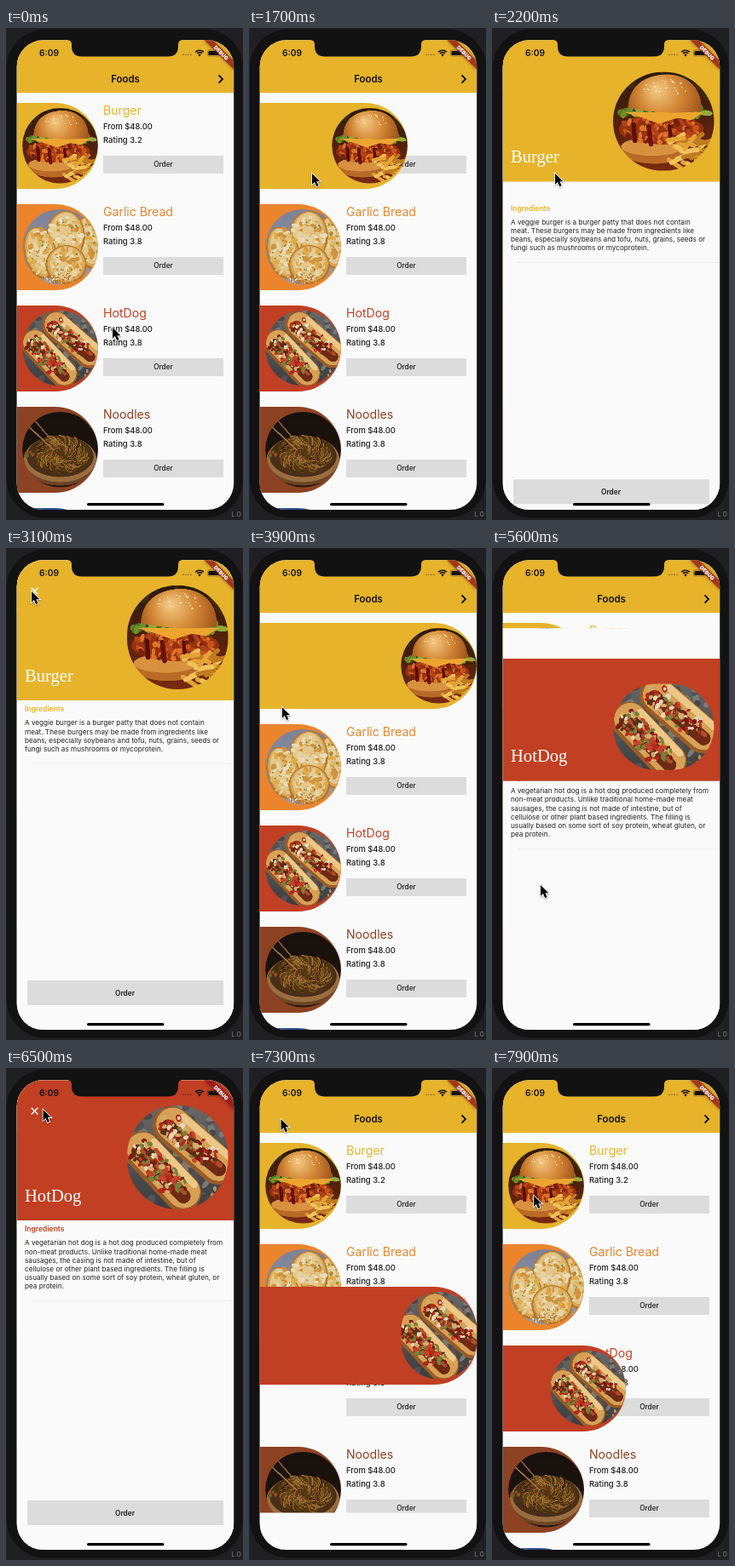
An HTML page with a canvas that plays this animation: 278 px wide and 578 px high, repeating every 8 s.

```html
<!DOCTYPE html>
<html lang="en">
<head>
<meta charset="utf-8">
<title>Foods</title>
<style>
html, body { margin: 0; width: 100%; height: 100%; overflow: hidden; background: #1c1c1e; }
canvas { display: block; width: 278px; height: 578px; }
</style>
</head>
<body>
<canvas id="stage"></canvas>
<script>
const LOOP = 8000, W = 278, H = 578;
const GROW = 500, FLIGHT = 400;
const SCREEN = { x: 12.6, y: 14.3, w: 254.6, h: 551.7 };
const RIGHT = SCREEN.x + SCREEN.w;
const SANS = 'Inter, Roboto, sans-serif';
const SERIF = '"Liberation Serif", "Noto Serif", serif';
const YELLOW = '#e6b32b', BEZEL = '#121212', PAPER = '#fafafa';

const canvas = document.getElementById('stage');
const dpr = window.devicePixelRatio || 1;
canvas.width = W * dpr;
canvas.height = H * dpr;
const g = canvas.getContext('2d');

const foods = [
  { name: 'Burger', color: YELLOW, rating: '3.2', art: burger, lines: [
    'A veggie burger is a burger patty that does not contain',
    'meat. These burgers may be made from ingredients like',
    'beans, especially soybeans and tofu, nuts, grains, seeds or',
    'fungi such as mushrooms or mycoprotein.'] },
  { name: 'Garlic Bread', color: '#ec842c', rating: '3.8', art: bread },
  { name: 'HotDog', color: '#c13f23', rating: '3.8', art: hotdog, lines: [
    'A vegetarian hot dog is a hot dog produced completely from',
    'non-meat products. Unlike traditional home-made meat',
    'sausages, the casing is not made of intestine, but of',
    'cellulose or other plant based ingredients. The filling is',
    'usually based on some sort of soy protein, wheat gluten, or',
    'pea protein.'] },
  { name: 'Noodles', color: '#8c4223', rating: '3.8', art: noodles },
  { name: '', color: '#2f4c8c', rating: '', art: noodles }
];

const visits = [
  { food: 0, grow: 1456, push: 1956, pop: 3450, shrink: 3900 },
  { food: 2, grow: 4939, push: 5439, pop: 7100, shrink: 7555 }
];

// time, x, y of the pointer tip
const pointer = [
  [0, 125, 352], [300, 125, 352], [1300, 74, 171], [2200, 74, 171],
  [2950, 30, 51], [3500, 30, 51], [4450, 53, 405], [4900, 53, 405],
  [5500, 57, 396], [5800, 57, 396], [6450, 44, 49], [6800, 36, 48],
  [7150, 36, 48], [7850, 49, 150], [8000, 49, 150]
];

const clamp = v => Math.max(0, Math.min(1, v));
const mix = (a, b, k) => a + (b - a) * k;
const rowTop = i => 88 + 119 * i;

function bezier(x1, y1, x2, y2) {
  const at = (a, b, s) => 3 * (1 - s) * (1 - s) * s * a + 3 * (1 - s) * s * s * b + s * s * s;
  return x => {
    let lo = 0, hi = 1;
    for (let i = 0; i < 24; i++) {
      const mid = (lo + hi) / 2;
      if (at(x1, x2, mid) < x) lo = mid; else hi = mid;
    }
    return at(y1, y2, lo);
  };
}
const slideEase = bezier(0.35, 0.91, 0.33, 0.97);
const heroEase = bezier(0.4, 0, 0.2, 1);

function seeded(seed) {
  return () => {
    seed = (seed * 16807) % 2147483647;
    return seed / 2147483647;
  };
}

/* ---- food pictures, drawn in a box of -44..44 ---- */

function oval(c, x, y, rx, ry, fill, turn = 0) {
  c.fillStyle = fill;
  c.beginPath();
  c.ellipse(x, y, rx, ry, turn, 0, 7);
  c.fill();
}

function stroke(c, color, width, x1, y1, x2, y2) {
  c.strokeStyle = color;
  c.lineWidth = width;
  c.lineCap = 'round';
  c.beginPath();
  c.moveTo(x1, y1);
  c.lineTo(x2, y2);
  c.stroke();
}

function specks(c, rnd, n, x, y, rx, ry, size, colors) {
  for (let i = 0; i < n; i++) {
    const a = rnd() * 6.28, d = Math.sqrt(rnd());
    oval(c, x + Math.cos(a) * d * rx, y + Math.sin(a) * d * ry,
      size * (0.5 + rnd()), size * (0.4 + rnd() * 0.6), colors[Math.floor(rnd() * colors.length)], rnd() * 3);
  }
}

function backdrop(c, top, bottom) {
  const fill = c.createLinearGradient(0, -44, 0, 44);
  fill.addColorStop(0, top);
  fill.addColorStop(1, bottom);
  c.fillStyle = fill;
  c.fillRect(-44, -44, 88, 88);
}

function burger(c, rnd) {
  backdrop(c, '#2a1a0c', '#7a2a10');
  specks(c, rnd, 30, 0, -22, 44, 22, 5, ['#3b2a10', '#26200c', '#47280f']);
  oval(c, -8, 25, 29, 12, '#b86a26');
  oval(c, -10, 22, 27, 8, '#d8923f');
  specks(c, rnd, 60, 0, -8, 39, 6, 4, ['#6f8f2a', '#4c701c', '#93a83a']);
  oval(c, -2, 7, 37, 13, '#96320f');
  specks(c, rnd, 100, -2, 7, 36, 12, 2.6, ['#c9531a', '#74200c', '#b2421a', '#de742a']);
  c.fillStyle = '#eda52f';
  c.beginPath();
  c.moveTo(-34, -8);
  c.lineTo(35, -8);
  c.lineTo(24, -1);
  c.lineTo(12, -3);
  c.lineTo(-4, 2);
  c.lineTo(-18, -3);
  c.fill();
  stroke(c, '#5c0f0a', 4, -26, 3, -25, 17);
  stroke(c, '#6b130b', 4, -13, 4, -11, 20);
  stroke(c, '#5c0f0a', 3, 5, 4, 6, 13);
  const bun = c.createRadialGradient(-6, -28, 3, 0, -20, 36);
  bun.addColorStop(0, '#f0c27a');
  bun.addColorStop(0.45, '#d48a38');
  bun.addColorStop(1, '#9c4f18');
  c.fillStyle = bun;
  c.beginPath();
  c.moveTo(-31, -12);
  c.bezierCurveTo(-30, -33, -14, -41, 4, -41);
  c.bezierCurveTo(24, -40, 34, -26, 33, -9);
  c.quadraticCurveTo(0, -5, -31, -12);
  c.fill();
  specks(c, rnd, 26, 2, -29, 22, 8, 0.8, ['#f7dfae', '#fae9c4']);
  for (let i = 0; i < 34; i++) {
    const x = 2 + rnd() * 34, y = 14 + rnd() * 26, a = -0.9 + rnd() * 1.7;
    stroke(c, ['#e2a437', '#c07a20', '#f0c25a'][i % 3], 3.8, x, y, x + Math.cos(a) * 14, y + Math.sin(a) * 14);
  }
}

function slice(c, rnd, x, y, rx, ry, turn) {
  oval(c, x, y, rx, ry, '#b5792f', turn);
  oval(c, x, y - 1, rx - 2, ry - 2, '#d9a655', turn);
  oval(c, x, y - 2, rx - 5, ry - 4, '#e2c68a', turn);
  specks(c, rnd, 46, x, y - 2, rx - 4, ry - 5, 3.2, ['#e0aa48', '#e6d3a2', '#d1933c', '#e8dcb8', '#dcb868']);
  specks(c, rnd, 14, x, y - 2, rx - 6, ry - 8, 1.2, ['#8b8a48', '#a08a42']);
}

function bread(c, rnd) {
  backdrop(c, '#7c8297', '#9a9cac');
  slice(c, rnd, 34, -5, 16, 31, -0.15);
  slice(c, rnd, 6, -12, 23, 30, 0.05);
  slice(c, rnd, -23, 7, 19, 31, -0.25);
  slice(c, rnd, 7, 21, 24, 23, -0.1);
  specks(c, rnd, 70, 6, 37, 24, 7, 1.1, ['#f2dfac', '#c98a3a', '#a96c28']);
}

function dog(c, rnd, x1, y1, x2, y2) {
  stroke(c, '#9a5c26', 32, x1, y1, x2, y2);
  stroke(c, '#d6a055', 28, x1 + 1, y1 - 1, x2 + 1, y2 - 1);
  stroke(c, '#ecc888', 6, x1 + 10, y1 - 7, x2 + 10, y2 - 7);
  stroke(c, '#6e2a14', 12, x1 - 3, y1 + 1, x2 + 1, y2 + 3);
  stroke(c, '#a8502a', 4, x1 - 2, y1 - 1, x2 + 2, y2);
  for (let i = 0; i < 9; i++) {
    const k = i / 10;
    specks(c, rnd, 13, mix(x1, x2, k) - 1, mix(y1, y2, k), 13, 9, 2.4,
      ['#b4281a', '#e6d6b4', '#7b7f38', '#7c1a12', '#d0ac6c', '#c8402a', '#5a3018']);
  }
}

function hotdog(c, rnd) {
  backdrop(c, '#686866', '#3c3d40');
  specks(c, rnd, 80, 0, 0, 44, 44, 4, ['#515257', '#47484b', '#7a7a76']);
  dog(c, rnd, -5, -27, 34, 7);
  dog(c, rnd, -30, -6, 4, 30);
  specks(c, rnd, 14, 30, 32, 10, 7, 2, ['#7d8050', '#a89a72', '#55583a']);
}

function noodles(c, rnd) {
  backdrop(c, '#17110d', '#20160f');
  oval(c, 0, 13, 43, 29, '#6b4626');
  oval(c, 0, 11, 42, 27, '#9a6d40');
  oval(c, 0, 8, 39, 24, '#4a2f18');
  oval(c, 2, 5, 32, 21, '#553613');
  c.lineWidth = 0.9;
  for (let i = 0; i < 220; i++) {
    const a = rnd() * 6.28, d = Math.sqrt(rnd());
    c.strokeStyle = ['#94662a', '#6e4717', '#a97c36', '#38230d'][i % 4];
    c.beginPath();
    c.arc(2 + Math.cos(a) * d * 27, 5 + Math.sin(a) * d * 17, 2 + rnd() * 6, a, a + 2);
    c.stroke();
  }
  specks(c, rnd, 14, 2, 4, 26, 14, 1.4, ['#6b6a2a', '#7c3a1a']);
  specks(c, rnd, 10, -36, 4, 5, 6, 2, ['#a04a20', '#5f6424']);
  stroke(c, '#a47443', 1.6, -40, -30, -8, 0);
  stroke(c, '#8b5f36', 1.6, -33, -38, -4, -4);
}

foods.forEach((food, i) => {
  const size = 352, pic = document.createElement('canvas');
  pic.width = pic.height = size;
  const c = pic.getContext('2d');
  c.scale(size / 88, size / 88);
  c.translate(44, 44);
  food.art(c, seeded(97 + i * 131));
  food.pic = pic;
});

/* ---- interface ---- */

function box(x, y, w, h, fill, r = 0) {
  g.fillStyle = fill;
  g.beginPath();
  g.roundRect(x, y, w, h, r);
  g.fill();
}

function text(str, x, y, size, weight, fill, align = 'left', family = SANS) {
  g.font = `${weight} ${size}px ${family}`;
  g.textAlign = align;
  g.fillStyle = fill;
  g.fillText(str, x, y);
}

function line(color, width, ...pts) {
  g.strokeStyle = color;
  g.lineWidth = width;
  g.lineCap = 'butt';
  g.beginPath();
  for (let i = 0; i < pts.length; i += 2) g.lineTo(pts[i], pts[i + 1]);
  g.stroke();
}

function picture(food, x, y, w, h) {
  const s = Math.max(w, h);
  g.save();
  g.beginPath();
  g.roundRect(x, y, w, h, Math.min(w, h) / 2);
  g.clip();
  g.drawImage(food.pic, x + (w - s) / 2, y + (h - s) / 2, s, s);
  g.restore();
}

function card(food, y, h, open) {
  const end = mix(107.8, RIGHT, open);
  box(SCREEN.x, y, end - SCREEN.x, h, food.color, [0, 50, 50, 0]);
  picture(food, end - 88.6, y + 6, 88.6, h - 12.5);
}

function banner(food, y, h) {
  box(SCREEN.x, y, SCREEN.w, h, food.color);
  picture(food, 142, y + 29.5, 118.5, h - 42.5);
  text(food.name, 22, y + h - 22.5, 20.6, 400, '#fff', 'left', SERIF);
}

function list(active, open, hidden) {
  box(SCREEN.x, 0, SCREEN.w, 76.2, YELLOW);
  text('Foods', 140, 64, 11.4, 600, '#111', 'center');
  line('#111', 1.9, 249.5, 55.3, 254, 60, 249.5, 64.7);
  foods.forEach((food, i) => {
    const y = rowTop(i);
    text(food.name, 114, y + 14, 14.1, 400, food.color);
    if (food.name) {
      text('From $48.00', 114, y + 31, 9.4, 500, '#1c1c1c');
      text('Rating ' + food.rating, 114, y + 47, 9.5, 500, '#1c1c1c');
      box(114, y + 62, 141, 21, '#dcdcdc');
      text('Order', 184.5, y + 75.3, 8.3, 500, '#1c1c1c', 'center');
    }
    if (i !== active) card(food, y, 101, 0);
    else if (!hidden) card(food, y, 101, open);
  });
}

function page(food, offset, settled) {
  g.save();
  g.translate(0, offset);
  box(SCREEN.x, SCREEN.y, SCREEN.w, SCREEN.h, PAPER);
  if (settled) banner(food, SCREEN.y, 164.7);
  line('#fff', 1.4, 29.8, 46.8, 37.4, 54.4);
  line('#fff', 1.4, 37.4, 46.8, 29.8, 54.4);
  text('Ingredients', 22, 192.3, 8.5, 600, food.color);
  food.lines.forEach((s, i) => text(s, 22, 208.3 + i * 10.2, 8.17, 400, '#222'));
  box(30, 212 + food.lines.length * 10.2, 237, 0.8, '#ececec');
  box(25, 508, 230, 29, '#dcdcdc');
  text('Order', 139.5, 525.5, 8.3, 600, '#1c1c1c', 'center');
  g.restore();
}

function app(t) {
  const v = visits.find(r => t >= r.grow && t < r.shrink + GROW);
  if (!v) return list(-1, 0, false);
  const food = foods[v.food];
  const open = t < v.shrink ? clamp((t - v.grow) / GROW) : 1 - clamp((t - v.shrink) / GROW);
  const shown = t >= v.push && t < v.pop + FLIGHT;
  list(v.food, open, shown);
  if (!shown) return;

  const leaving = t >= v.pop;
  const k = clamp((t - (leaving ? v.pop : v.push)) / FLIGHT);
  const slide = slideEase(k), fly = heroEase(k);
  const settled = !leaving && k === 1;
  page(food, SCREEN.h * (settled ? 0 : leaving ? slide : 1 - slide), settled);
  if (settled) return;
  const up = leaving ? 1 - fly : fly, pad = leaving ? 0 : 4;
  const y = mix(rowTop(v.food) - pad, SCREEN.y, up), h = mix(101 + 2 * pad, 164.7, up);
  if (leaving) card(food, y, h, 1); else banner(food, y, h);
}

function statusBar() {
  text('6:09', 39, 33.3, 10.2, 600, '#111');
  for (let i = 0; i < 4; i++) box(207 + i * 3, 30.5, 1.7, 1.7, 'rgba(0,0,0,.38)', 0.8);
  g.strokeStyle = '#111';
  g.lineCap = 'butt';
  g.lineWidth = 1.6;
  [6.8, 4.2].forEach(r => {
    g.beginPath();
    g.arc(227, 33, r, -2.36, -0.78);
    g.stroke();
  });
  g.fillStyle = '#111';
  g.beginPath();
  g.moveTo(227, 33.4);
  g.arc(227, 33, 2.3, -2.36, -0.78);
  g.fill();
  g.strokeStyle = 'rgba(0,0,0,.4)';
  g.lineWidth = 0.7;
  g.beginPath();
  g.roundRect(236.3, 25.8, 14.5, 7.4, 2);
  g.stroke();
  box(237.4, 26.9, 12.3, 5.2, '#111', 1.2);
}

function ribbon() {
  g.save();
  g.translate(RIGHT, SCREEN.y);
  g.rotate(Math.PI / 4);
  g.shadowColor = 'rgba(0,0,0,.5)';
  g.shadowBlur = 4 * dpr;
  box(-24.6, 17.2, 49.2, 7.4, 'rgba(160,28,28,.7)');
  g.shadowColor = 'transparent';
  text('DEBUG', 0, 23.1, 6.1, 900, '#fff', 'center');
  g.restore();
}

function notch() {
  g.fillStyle = BEZEL;
  g.beginPath();
  g.moveTo(72, 14);
  g.quadraticCurveTo(77, 14.5, 77, 19);
  g.lineTo(77, 22);
  g.quadraticCurveTo(77.5, 33.5, 89, 33.5);
  g.lineTo(190, 33.5);
  g.quadraticCurveTo(201.5, 33.5, 202, 22);
  g.lineTo(202, 19);
  g.quadraticCurveTo(202, 14.5, 207, 14);
  g.fill();
}

function cursor(t) {
  const i = pointer.findIndex(p => p[0] > t);
  const a = pointer[i - 1], b = pointer[i];
  const k = (t - a[0]) / (b[0] - a[0]), e = k * k * (3 - 2 * k);
  g.save();
  g.translate(mix(a[1], b[1], e), mix(a[2], b[2], e));
  g.scale(0.85, 0.85);
  g.beginPath();
  [0, 0, 0, 15, 3.5, 11.8, 6.2, 17.8, 8.9, 16.6, 6.3, 10.8, 11, 10.8]
    .forEach((x, n, p) => { if (n % 2 === 0) g.lineTo(x, p[n + 1]); });
  g.closePath();
  g.lineJoin = 'miter';
  g.lineWidth = 2;
  g.strokeStyle = '#fff';
  g.shadowColor = 'rgba(0,0,0,.35)';
  g.shadowBlur = 2 * dpr;
  g.shadowOffsetY = dpr;
  g.stroke();
  g.shadowColor = 'transparent';
  g.fillStyle = '#000';
  g.fill();
  g.restore();
}

function draw(t) {
  g.setTransform(dpr, 0, 0, dpr, 0, 0);
  box(0, 0, W, H, '#202022');
  text('L O', 264.5, 573.5, 7, 400, '#8a8a8a');
  box(0, 0.5, 279, 576, '#1f1f20', 46);
  box(1, 1.5, 277, 574, BEZEL, 45);
  g.save();
  g.beginPath();
  g.roundRect(SCREEN.x, SCREEN.y, SCREEN.w, SCREEN.h, 31);
  g.clip();
  box(12, 14, 256, 553, PAPER);
  app(t);
  statusBar();
  ribbon();
  box(95, 558, 90.5, 3.2, '#000', 1.6);
  g.restore();
  notch();
  cursor(t);
}

const start = performance.now();
function tick() {
  draw((performance.now() - start) % LOOP);
  requestAnimationFrame(tick);
}
tick();
</script>
</body>
</html>
```
